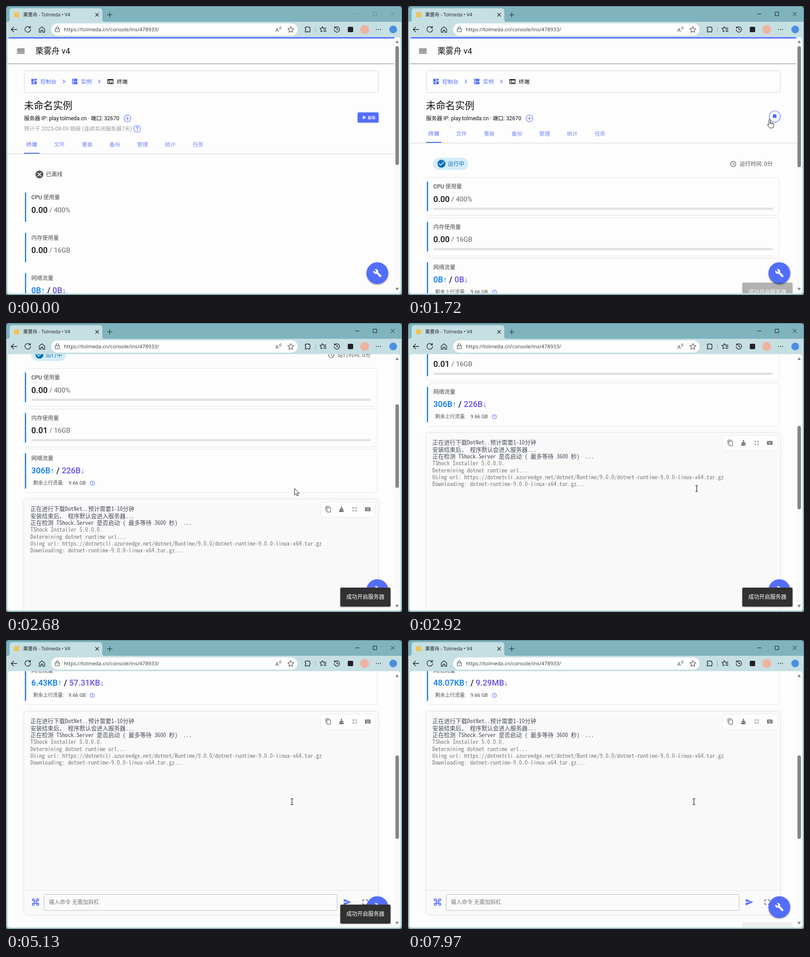
These frames come from a looping animation (876x640 px, 8000 ms). An HTML page:

```html
<!DOCTYPE html>
<html lang="zh-CN">
<head>
<meta charset="utf-8">
<title>Console</title>
<style>
html, body { margin: 0; width: 876px; height: 640px; overflow: hidden; background: #2e4a50; }
svg { display: block; }
text { white-space: pre; font-family: Roboto, "Noto Sans CJK SC", "Noto Sans CJK", sans-serif; }
text.ui { font-family: "Open Sans", "Noto Sans CJK SC", "Noto Sans CJK", sans-serif; }
text.term { font-family: "Noto Sans Mono CJK SC", "Noto Sans CJK SC", "Noto Sans Mono", monospace; }
.arrow { font-family: "Liberation Sans", sans-serif; font-weight: 400; }
</style>
</head>
<body>
<svg id="stage" width="876" height="640" viewBox="0 0 876 640"></svg>
<script>
const LOOP = 8000, BLUE = '#536dfe', INK = '#1d1f20';

const ICON = {
  grid: 'M3 13h8V3H3v10zm0 8h8v-6H3v6zm10 0h8V11h-8v10zm0-18v6h8V3h-8z',
  server: 'M20 13H4c-.6 0-1 .4-1 1v6c0 .6.4 1 1 1h16c.6 0 1-.4 1-1v-6c0-.6-.4-1-1-1zM7 19a2 2 0 1 1 0-4 2 2 0 0 1 0 4zM20 3H4c-.6 0-1 .4-1 1v6c0 .6.4 1 1 1h16c.6 0 1-.4 1-1V4c0-.6-.4-1-1-1zM7 9a2 2 0 1 1 0-4 2 2 0 0 1 0 4z',
  shell: 'M20 4H4a2 2 0 0 0-2 2v12a2 2 0 0 0 2 2h16a2 2 0 0 0 2-2V6a2 2 0 0 0-2-2zm0 14H4V8h16v10zm-2-1h-6v-2h6v2zM7.5 17l-1.4-1.4L8.7 13l-2.6-2.6L7.5 9l4 4-4 4z',
  next: 'M10 6L8.6 7.4l4.6 4.6-4.6 4.6L10 18l6-6z',
  cancel: 'M12 2a10 10 0 1 0 0 20 10 10 0 0 0 0-20zm5 13.6L15.6 17 12 13.4 8.4 17 7 15.6l3.6-3.6L7 8.4 8.4 7l3.6 3.6L15.6 7 17 8.4 13.4 12z',
  check: 'M12 2a10 10 0 1 0 0 20 10 10 0 0 0 0-20zm-2 15l-5-5 1.4-1.4 3.6 3.6 7.6-7.6L19 8l-9 9z',
  copy: 'M16 1H4a2 2 0 0 0-2 2v14h2V3h12V1zm3 4H8a2 2 0 0 0-2 2v14c0 1.1.9 2 2 2h11a2 2 0 0 0 2-2V7a2 2 0 0 0-2-2zm0 16H8V7h11v14z',
  broom: 'M10 2h4v7h-4zM6 10h12l1 5H5zM4 16h16v6h-3v-3h-2v3H4z',
  full: 'M7 14H5v5h5v-2H7v-3zm-2-4h2V7h3V5H5v5zm12 7h-3v2h5v-5h-2v3zM14 5v2h3v3h2V5h-5z',
  keys: 'M20 5H4a2 2 0 0 0-2 2v10c0 1.1.9 2 2 2h16a2 2 0 0 0 2-2V7a2 2 0 0 0-2-2zM5 8h2v2H5zm3 0h2v2H8zm3 0h2v2h-2zm3 0h2v2h-2zm3 0h2v2h-2zM5 11h2v2H5zm3 0h2v2H8zm3 0h2v2h-2zm3 0h2v2h-2zm3 0h2v2h-2zM8 15h8v2H8z',
  send: 'M2 21l21-9L2 3v7l15 2-15 2z',
  wrench: 'M22.7 19l-9.1-9.1c.9-2.3.4-5-1.5-6.9-2-2-5-2.4-7.4-1.3L9 6 6 9 1.6 4.7C.4 7.1.9 10.1 2.9 12.1c1.9 1.9 4.6 2.4 6.9 1.5l9.1 9.1c.4.4 1 .4 1.4 0l2.3-2.3c.5-.4.5-1.1.1-1.4z'
};

// Drawing helpers; text is placed by its vertical centre.
const box = (x, y, w, h, fill, r = 0, more = '') =>
  `<rect x="${x}" y="${y}" width="${w}" height="${h}" rx="${r}" fill="${fill}" ${more}/>`;
const dot = (x, y, r, fill, more = '') => `<circle cx="${x}" cy="${y}" r="${r}" fill="${fill}" ${more}/>`;
const line = (d, color = INK, w = 1.2, more = '') =>
  `<path d="${d}" fill="none" stroke="${color}" stroke-width="${w}" stroke-linecap="round" stroke-linejoin="round" ${more}/>`;
const text = (x, y, size, str, fill, more = '') =>
  `<text x="${x}" y="${y + size * 0.365}" font-size="${size}" fill="${fill}" ${more}>${str}</text>`;
const icon = (name, x, y, size, fill) =>
  `<path transform="translate(${x - size / 2} ${y - size / 2}) scale(${size / 24})" d="${ICON[name]}" fill="${fill}"/>`;
const ring = (x, y, r, color, w = 1.2) => dot(x, y, r, 'none', `stroke="${color}" stroke-width="${w}"`);
const group = (id, inner) => `<g id="${id}">${inner}</g>`;
const MID = 'text-anchor="middle"', BOLD = 'font-weight="500"';

function browser() {
  const bar = '#c6dfe3';
  return box(0, 0, 876, 640, '#7fb4be', 7) + box(0, 35, 876, 605, bar, 6) + box(0, 35, 876, 20, bar) +
    `<path d="M3 35q5 0 5-5V11q0-6 6-6H207q6 0 6 6V30q0 5 5 5z" fill="${bar}"/>` +
    box(18, 14, 11, 11, '#f0c453', 1) +
    text(38, 19.5, 10.5, '栗雾舟 - Tolmeda • V4', INK, 'class="ui"') +
    line('M198 16l7 7m0-7l-7 7M224 19.5h11m-5.5-5.5v11', INK, 1.1) +
    group('winbtn', line('M773 17.5h8M812.5 13.5h7.5v8h-7.5zM851.5 13.5l8 8m0-8l-8 8', 'currentColor', 1)) +
    line('M24 52H11.5m5.5-5.5l-5.5 5.5 5.5 5.5M53 47.5a6.3 6.3 0 1 0 1.5 4.5M54 45v3.5h-3.5M73.5 51l6-5 6 5v7h-4v-4.5h-4V58h-4z', INK, 1.3) +
    box(100, 38.5, 545, 27, '#fdfefe', 13.5) +
    line('M109 50.5h9v6.5h-9zM111 50.5v-2a2.5 2.5 0 0 1 5 0v2M113.5 53.5v.4', '#444', 1.1) +
    text(128, 52, 11.4, 'https://tolmeda.cn/console/ins/478933/', '#333', 'class="ui"') +
    text(596, 53, 11.5, 'A', '#444', 'class="ui"') + line('M605 47q1.5 2 0 4m2-6q3 4 0 7', '#444', 1) +
    line('M630 45.5l2 4.3 4.7.6-3.5 3.2.9 4.7-4.1-2.3-4.1 2.3.9-4.7-3.5-3.2 4.7-.6z', '#444', 1.1) +
    line('M662 47h3.5a1.8 1.8 0 0 1 3.4 0H672v3.5a1.8 1.8 0 0 1 0 3.4V57.5h-3.5a1.8 1.8 0 0 0-3.4 0H662V54a1.8 1.8 0 0 0 0-3.5z', INK, 1.3) +
    line('M684.5 46v12', '#93b3b8', 1) +
    line('M700 45.5l1.7 3.5H708M700 45.5l-1.7 3.5-4 .6 3 3-.7 4.4 3.4-1.8M703 52.5h5M703 56h5', INK, 1.3) +
    line('M727.5 48a6 6 0 1 1-1.5 4M726.5 45.5v3h3M732 48.5v4h3', INK, 1.3) +
    box(756, 46, 12, 12, '#222', 2.5) + dot(793.5, 52, 10, '#eeb3a0') +
    [819.5, 824, 828.5].map(x => dot(x, 52, 1.1, INK)).join('') + dot(856.5, 52, 8.5, '#4a8fe0');
}

const tabs = () => ['终端', '文件', '重装', '备份', '管理', '统计', '任务']
  .map((s, i) => text(57 + i * 61.3, 282.5, 11.9, s, i ? '#7186fb' : BLUE, MID)).join('') +
  box(4, 303, 855, 1, '#cfcfcf') + box(40, 301, 34, 2, BLUE);

const label = (y, str) => text(56, y, 12.2, str, '#4c4c4c');

const meter = (y, name, limit, id) =>
  box(42, y + 10, 2.4, 65, '#0a74f0') + label(y + 20.7, name) +
  text(56, y + 48, 18.2, `<tspan id="${id}">0.00</tspan>`, '#111', BOLD) +
  text(96, y + 48.5, 15, limit, '#666');

const card = (y, h) => box(41.5, y + .5, 780, h, '#fdfdfd', 5, 'stroke="#e2e2e2"');
const track = y => box(56, y, 751, 5, '#e2e2e2', 2.5);
const help = (x, y, r, size) => ring(x, y, r, BLUE, 1.1) + text(x, y, size, '?', BLUE, MID + ' ' + BOLD);

function common() {
  return tabs() + meter(379, `<tspan ${BOLD}>CPU</tspan> 使用量`, '/ 400%', 'cpu') + meter(468.5, '内存使用量', '/ 16GB', 'mem') +
    box(42, 567.5, 2.4, 78, '#0a74f0') + label(578.7, '网络流量') +
    text(56, 605, 18, '<tspan id="up" fill="#0a7cf2"/><tspan class="arrow" fill="#0a7cf2">↑</tspan> / <tspan id="down" fill="#6c53df"/><tspan class="arrow" fill="#6c53df">↓</tspan>', '#111', BOLD) +
    text(60, 633.5, 10.9, '剩余上行流量:', '#555') + text(138.5, 633.5, 10.9, '9.66 GB', '#444') + help(191, 633.5, 4.7, 8);
}

function offline() {
  return text(40, 271.5, 11.9, '预计于 2025-08-09 销毁 (连续关闭服务器7天)', '#9a9a9a') + help(290, 272, 7.5, 12) +
    box(778, 236, 46, 22, BLUE, 2.5, 'filter="url(#soft)"') + box(778, 236, 46, 22, BLUE, 2.5) +
    box(778, 236, 46, 22, '#fff', 2.5, 'id="hover"') +
    dot(798, 247, 0, '#fff', 'id="ripple" opacity=".25" clip-path="url(#btn)"') +
    '<path d="M789.5 242.5v8.5l7-4.25z" fill="#fff"/>' + text(800, 247, 8.5, '启动', '#fff', 'font-weight="700"') +
    icon('cancel', 74, 373, 21, '#585858') + text(88.5, 373, 12.2, '已离线', '#444');
}

const LOG = [
  '正在进行下载DotNet..预计需要1-10分钟', '安装结束后， 程序默认会进入服务器...',
  '正在检测 TShock.Server 是否启动 ( 最多等待 3600 秒)  ...', 'TShock Installer 5.0.0.0.',
  'Determining dotnet runtime url...',
  'Using url: https://dotnetcli.azureedge.net/dotnet/Runtime/9.0.0/dotnet-runtime-9.0.0-linux-x64.tar.gz',
  'Downloading: dotnet-runtime-9.0.0-linux-x64.tar.gz...'
];
const termLine = (s, i) => text(54, 690.5 + i * 15.35, 12.77, s, i < 3 ? '#454a5a' : '#7b7b7b', 'class="term"');

function terminal() {
  return box(40, 668.5, 783.5, 451, '#f0f0f0', 6, 'filter="url(#wide)"') +
    box(39.5, 668.5, 784, 451, '#fafafa', 6, 'stroke="#e3e3e3"') + box(50, 679, 763, 382, '#f9f9f9') +
    group('intro', termLine('感谢您使用 栗雾舟 KRT4.0', 0)) + group('log', LOG.map(termLine).join('')) +
    box(697, 675.5, 119.5, 33, '#ddd', 5, 'filter="url(#soft)"') + box(697, 675.5, 119.5, 33, '#fdfdfd', 5) +
    ['copy', 'broom', 'full', 'keys'].map((n, i) => icon(n, 713 + i * 29.1, 691.5, 14.5, '#666')).join('') +
    box(40, 1065, 783.5, 1, '#e0e0e0') +
    line('M9 9V6.5A2.5 2.5 0 1 0 6.5 9H17.5A2.5 2.5 0 1 0 15 6.5V17.5A2.5 2.5 0 1 0 17.5 15H6.5A2.5 2.5 0 1 0 9 17.5Z', BLUE, 2, 'transform="translate(54.5 1080.5) scale(.9)"') +
    box(84.5, 1074.5, 648, 35.5, '#fbfbfb', 2, 'stroke="#b9b9b9"') +
    text(95, 1091.5, 12, '输入命令 无需加斜杠', '#777') +
    icon('send', 755, 1091.5, 19, BLUE) + icon('full', 794.5, 1091.5, 20, '#666');
}

function online() {
  return ring(811.3, 244.7, 12.2, BLUE) + box(807, 240, 8, 8, BLUE) +
    box(55.5, 336, 77.5, 27, '#d3ecf8', 13.5) + icon('check', 74, 349.3, 21, '#0a6fba') +
    text(88, 349.2, 12.2, '运行中', '#0a6fba') +
    ring(719.5, 350, 5.8, '#555', 1.3) + line('M719.5 346.5v4l2.5 1.5', '#555', 1.1) +
    text(733.5, 349.2, 12.1, '运行时间: 0分', '#555') +
    card(379, 84) + track(446.5) + card(469, 84) + track(536) + card(558, 96) + terminal();
}

function page() {
  return box(4, 72, 855, 56, '#999', 0, 'filter="url(#soft)"') + box(4, 69, 855, 58, '#fdfdfd') +
    box(4, 69, 855, 3, BLUE) + box(4, 127, 855, 1, '#a8a8a8') +
    line('M25 95.5h15.5M25 99.7h15.5M25 104h15.5', '#111', 1.7) +
    text(65, 99.5, 17.9, '栗雾舟 v4', '#111') +
    box(40.5, 143.5, 783, 48, '#fdfdfd', 3, 'stroke="#d2d2d2"') +
    icon('grid', 62, 167.3, 16, BLUE) + text(76, 167.5, 11.9, '控制台', BLUE) + icon('next', 128, 167.3, 17, BLUE) +
    icon('server', 152, 167.3, 16, BLUE) + text(166, 167.5, 11.9, '实例', BLUE) + icon('next', 206.5, 167.3, 17, BLUE) +
    icon('shell', 231, 167.3, 16, '#111') + text(245, 167.5, 11.9, '终端', '#111') +
    text(40, 220, 21.4, '未命名实例', '#111', 'font-weight="300"') +
    text(40, 248.3, 11.9, '服务器 IP: play.tolmeda.cn · 端口: 32670', '#111') +
    ring(268.7, 249, 7.5, BLUE, 1.1) + line('M264.7 249h8m-4-4v8', BLUE, 1.1) +
    group('off', offline()) + group('on', online()) + group('low', common());
}

const overlay = box(859, 69, 13, 567, '#fafafa') +
  '<path d="M861.5 82h7.5l-3.75-6zM861.5 624h7.5l-3.75 6z" fill="#858585"/>' +
  box(861.5, 89, 7.7, 263, '#858585', 3.8, 'id="thumb"') +
  dot(821.5, 593, 24, '#888', 'filter="url(#soft)"') + dot(821.5, 591.5, 24, BLUE) + icon('wrench', 821.7, 591.5, 20, '#fff') +
  group('toast', box(740, 587.5, 110.5, 41, '#777', 2, 'filter="url(#soft)"') + box(739.5, 586, 111, 42, '#313131', 2.5) +
    text(753, 607, 12, '成功开启服务器', '#fff', BOLD));

const cursors =
  group('arrow', '<path d="M0 0v14.5l3.3-3.2 2.3 5.2 2.3-1-2.3-5h4.6z" fill="#fff" stroke="#111"/>') +
  group('hand', '<path d="M-1.5 1.5a1.6 1.6 0 0 1 3.2 0V7l6 1.3q2 .6 1.8 3l-1 5q-.5 2.7-3 2.7H2q-2 0-3-1.8l-3.7-5.8q.5-2 3.2 0z" fill="#fff" stroke="#111" stroke-linejoin="round"/><path d="M1.7 7v3M4.3 8v2.5M7 8.5v2" stroke="#111"/>') +
  group('ibeam', line('M-2.5-6.5h2l.5.5.5-.5h2M0-6V6M-2.5 6.5h2l.5-.5.5.5h2', '#111', 1.1));

document.getElementById('stage').innerHTML =
  `<defs><clipPath id="view">${box(4, 69, 868, 567, '#000', 5)}</clipPath>
  <clipPath id="btn">${box(778, 236, 46, 22, '#000', 2.5)}</clipPath>
  <filter id="soft" x="-30%" y="-60%" width="160%" height="220%"><feGaussianBlur stdDeviation="1.5"/></filter>
  <filter id="wide" x="-5%" y="-5%" width="110%" height="110%"><feGaussianBlur stdDeviation="5"/></filter></defs>` +
  browser() + `<g clip-path="url(#view)">${box(4, 69, 868, 567, '#fdfdfd')}${group('page', page())}${overlay}</g>` +
  box(.5, .5, 875, 639, 'none', 7, 'stroke="#4c747c"') + group('cursor', cursors);

const $ = id => document.getElementById(id);
const show = (id, on) => $(id).setAttribute('display', on ? 'inline' : 'none');
const move = (id, x, y) => $(id).setAttribute('transform', `translate(${x} ${y})`);
const clamp = v => Math.max(0, Math.min(1, v));

// Linear interpolation in rows of [time, value...].
function at(keys, t, col = 1) {
  if (t <= keys[0][0]) return keys[0][col];
  for (let i = 1; i < keys.length; i++) {
    const a = keys[i - 1], b = keys[i];
    if (t <= b[0]) return a[col] + (b[col] - a[col]) * (t - a[0]) / (b[0] - a[0]);
  }
  return keys[keys.length - 1][col];
}
const latest = (rows, t) => rows.filter(r => r[0] <= t).pop();

const SCROLL = [[2240, 0], [2320, 12], [2440, 54.5], [2720, 316], [2840, 405], [2920, 426], [3120, 426],
  [3160, 442], [3200, 470], [3280, 503.5], [3360, 509.5], [3480, 511.5]];
const POINTER = [[120, 42, 626], [240, 260, 520], [360, 590, 350], [440, 750, 268], [520, 796, 243], [1000, 796, 243],
  [1280, 799, 250], [1720, 800, 251], [1840, 772, 278], [2040, 680, 346], [2240, 637, 367],
  [2700, 638.5, 366.5], [3730, 638.5, 366.5], [4050, 632.5, 358]];
const TRAFFIC = [[0, '0B', '0B'], [2680, '306B', '226B'], [3770, '2.62KB', '2.14KB'],
  [5130, '6.43KB', '57.31KB'], [6460, '9.71KB', '629.56KB'], [7370, '48.07KB', '9.29MB']];

function draw(t) {
  const on = t >= 1440, loaded = t >= 2680, s = at(SCROLL, t);
  $('winbtn').style.color = t < 1000 ? '#5f8c95' : '#111';
  show('off', !on);
  show('on', on);
  show('intro', !loaded);
  show('log', loaded);
  move('page', 0, -Math.floor(s)); // whole pixels keep rules and text crisp
  move('low', 0, on ? 0 : 24);

  $('hover').setAttribute('opacity', t >= 720 ? .14 : 0);
  $('ripple').setAttribute('r', 34 * clamp((t - 960) / 320));

  const [, up, down] = latest(TRAFFIC, t);
  $('up').textContent = up;
  $('down').textContent = down;
  $('mem').textContent = loaded ? '0.01' : '0.00';

  $('thumb').setAttribute('y', 89 + s * (loaded ? .3255 : .46));
  $('thumb').setAttribute('height', loaded ? 185 : on ? 268 : 263);

  const p = clamp((t - 1500) / 600) * (1 - clamp((t - 7400) / 610));
  $('toast').setAttribute('opacity', p);
  move('toast', 0, 42 * (1 - p));

  const beam = s > 312, hand = t >= 480 && t < 1800;
  show('cursor', t >= 120);
  move('cursor', at(POINTER, t), at(POINTER, t, 2));
  show('ibeam', beam);
  show('hand', hand);
  show('arrow', !beam && !hand);
}

const begin = performance.now();
function tick() {
  draw((performance.now() - begin) % LOOP);
  requestAnimationFrame(tick);
}
tick();
</script>
</body>
</html>
```
